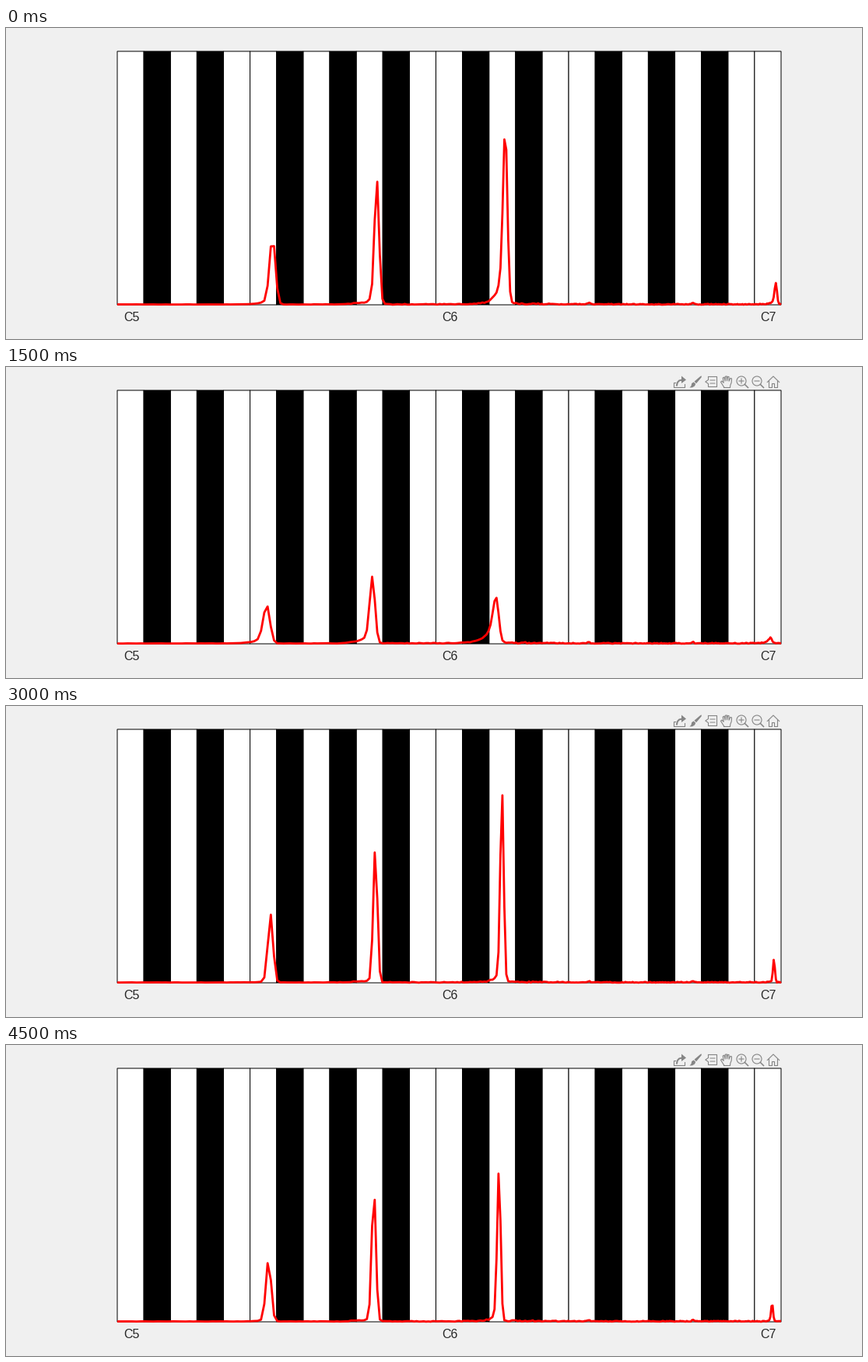
Animation of 1100x400 px, one loop 5 s. Source, as a matplotlib script:

```python
import numpy as np
import matplotlib.pyplot as plt
from matplotlib.animation import FuncAnimation
from matplotlib.patches import Circle, Polygon, Rectangle

W, H, DPI = 1100, 400, 100
PX = 72 / DPI                     # points per pixel
LEFT, TOP, RIGHT, BASE = 143, 30, 996, 356
KEY_W = (RIGHT - LEFT) / 25
C5_HZ, BIN_HZ = 523.25, 5
BLACK_KEYS = {1, 3, 6, 8, 10}
STEPS = 10
GREY = "#858585"

# Key points over the loop: pitch drop in Hz, how fast the pitch glides,
# and the height in pixels of the low, middle and high notes.
KEY_STEPS = [0, 1, 2, 3, 4, 5, 7, 9]
DROP = [0, 7, 30, 24, 12.5, 7, 9, 16]
GLIDE = [0.3, 0.25, 1, 0.6, 0.35, 0.1, 0.1, 0.1]
LOW = [88, 88, 52, 50, 72, 90, 86, 80]
MID = [162, 172, 90, 86, 142, 175, 173, 172]
HIGH = [230, 215, 44, 60, 165, 272, 222, 195]
TOP_NOTE = [0.12 * h for h in HIGH]

# Frequency at rest, how far the note follows the pitch drop, heights.
NOTES = [(712.5, 0.38, LOW), (894, 0.36, MID),
         (1182, 1, HIGH), (2129.5, 1.05, TOP_NOTE)]

freqs = np.arange(505, 2156, BIN_HZ)
xs = LEFT + KEY_W / 2 + 12 * KEY_W * np.log2(freqs / C5_HZ)
xs = np.clip(xs, LEFT, RIGHT)


def at(step, track):
    return np.interp(step, KEY_STEPS, track)


def peak(center, glide):
    """Bell over the bins; a gliding note leaves a tail on its lower side."""
    d = (freqs - center) / BIN_HZ
    bell = np.exp(-0.5 * (d / (0.75 + 1.2 * glide)) ** 2)
    tail = np.exp(-np.abs(d) / (2 + 3 * glide))
    mix = np.where(d < 0, min(glide, 1), 0)
    return (1 - mix) * bell + mix * tail


def bump(center, height, width):
    return height * np.exp(-((xs - center) / width) ** 2)


def spectrum(step):
    """Heights above the baseline: a quiet noise floor plus four notes."""
    rng = np.random.default_rng(40 + step)
    rough = np.interp(xs, [LEFT, 400, 450, RIGHT], [0.15, 0.25, 0.6, 0.7])
    floor = 0.4 + rough * rng.uniform(-0.4, 1.2, xs.size)
    floor += bump(648, 1.6, 45) * rng.uniform(0, 1, xs.size)
    floor += bump(749, 1.8, 2) + bump(882.5, 2, 1.5) + bump(450, 1, 9)
    for hz, follow, heights in NOTES:
        center = hz - follow * at(step, DROP)
        floor += at(step, heights) * peak(center, follow * at(step, GLIDE))
    return floor


fig = plt.figure(figsize=(W / DPI, H / DPI), dpi=DPI, facecolor="#f0f0f0")
ax = fig.add_axes([0, 0, 1, 1])
ax.set(xlim=(0, W), ylim=(H, 0))
ax.axis("off")

for key in range(25):
    color = "black" if key % 12 in BLACK_KEYS else "white"
    ax.add_patch(Rectangle((LEFT + key * KEY_W, TOP), KEY_W, BASE - TOP, fc=color,
                           ec="black", lw=PX, snap=False,
                           zorder=2 if color == "black" else 1))

for label, x in (("C5", 161.8), ("C6", 570.8), ("C7", 979.6)):
    ax.text(x, 377, label, ha="center", va="baseline", color="#262626",
            family="Liberation Sans", size=16 * PX)

toolbar = []


def stroke(*pts, lw=1.1):
    toolbar.extend(ax.plot(*zip(*pts), color=GREY, lw=lw * PX, snap=False,
                           solid_joinstyle="round"))


def fill(*pts):
    toolbar.append(ax.add_patch(Polygon(pts, fc=GREY, ec="none")))


def ring(x, y, r):
    toolbar.append(ax.add_patch(Circle((x, y), r, fc="none", ec=GREY, lw=1.1 * PX)))


# Export
stroke((860.5, 20.5), (858.5, 20.5), (858.5, 26.5), (872.5, 26.5), (872.5, 22.5))
stroke((862, 23.5), (862.8, 20), (865, 17.5), (869, 16.5), lw=2)
fill((868, 11.5), (874, 16.5), (868, 21))
# Brush
fill((894, 11.5), (892.5, 11.8), (884.5, 18.6), (887, 21.2), (893.5, 13.5))
fill((883.8, 19.4), (886.2, 21.8), (885, 24.5), (882, 26.3), (878.5, 26.5),
     (880.5, 24.3), (881.2, 21))
# Data tip
stroke((902.5, 12.5), (913.5, 12.5), (913.5, 25.5), (902.5, 25.5), (902.5, 21.5),
       (898.8, 19), (902.5, 16.5), (902.5, 12.5))
for y in (17, 21):
    stroke((905, y), (911, y), lw=1)
# Hand
stroke((923, 26.5), (920.5, 22.5), (918.5, 19.3), (919.8, 18), (922.2, 20.3),
       (921.2, 14), (922.8, 13.2), (924.2, 18), (924.2, 12.3), (926, 11.8),
       (926.5, 17.8), (927.4, 12.3), (929, 12.6), (929, 18.2), (930.8, 14.4),
       (932.5, 14.9), (932.2, 20), (930.8, 23.5), (930.5, 26.5), (923, 26.5))
# Zoom in, zoom out
for x in (945, 965):
    ring(x, 18, 6)
    stroke((x + 4.3, 22.3), (x + 8.5, 26.5), lw=1.5)
    stroke((x - 3, 18), (x + 3, 18))
stroke((945, 15), (945, 21))
# Home
stroke((978.3, 19.5), (986, 12), (993.7, 19.5))
stroke((980.5, 18), (980.5, 26.5), (984.5, 26.5), (984.5, 21.5), (987.5, 21.5),
       (987.5, 26.5), (991.5, 26.5), (991.5, 18))

curve, = ax.plot([], [], color="red", lw=2.8 * PX, solid_joinstyle="round",
                 solid_capstyle="butt", zorder=5)


def draw(step):
    curve.set_data(xs, BASE - spectrum(step))
    for item in toolbar:
        item.set_visible(step > 0)
    return [curve, *toolbar]


anim = FuncAnimation(fig, draw, frames=STEPS, init_func=lambda: draw(0),
                     interval=500, repeat=True, repeat_delay=0, blit=False)
plt.show()
```
